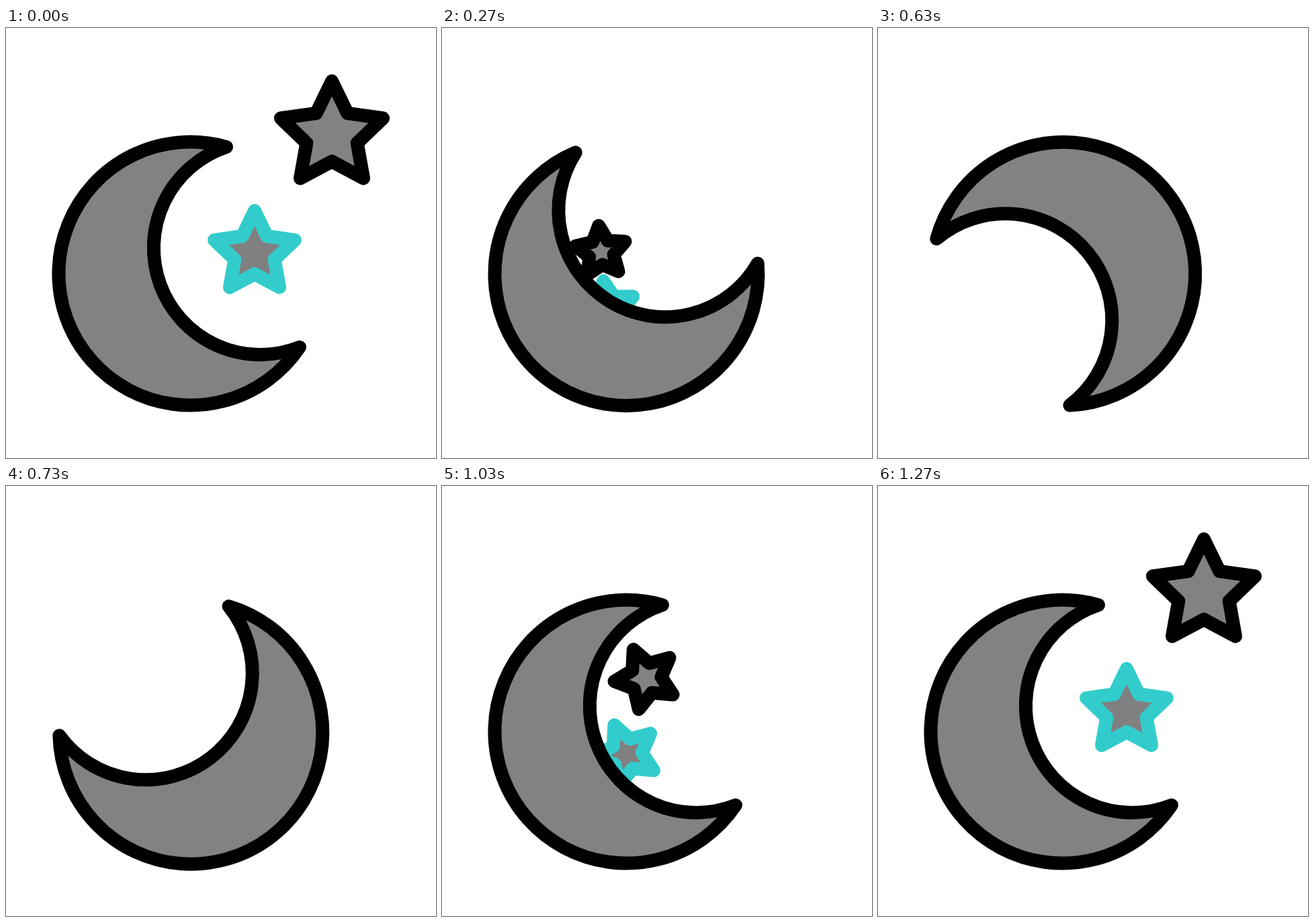
These frames come from a looping animation (640 by 640 pixels, 1.67 s). An HTML page with a canvas:

```html
<!DOCTYPE html>
<html lang="en">
<head>
<meta charset="utf-8">
<title>Moon and stars</title>
<style>
  html, body { margin: 0; width: 100%; height: 100%; overflow: hidden; background: #fff; }
  canvas { display: block; width: 640px; height: 640px; }
</style>
</head>
<body>
<canvas id="stage" width="640" height="640"></canvas>
<script>
const ctx = document.getElementById('stage').getContext('2d');
const LOOP = 1670;
const LAST_STEP = 38;
const GRAY = '#818281';

// Times below are in steps of 1/30 s.
const STARS_HIDDEN = 12;
const RAD = Math.PI / 180;
const moonPivot = { x: 275.3, y: 365.8 };
const moonPath = new Path2D(
  'M328 177 A196 196 0 1 0 437 475 A158.71 158.71 0 1 1 328 177 Z');

const stars = [
  { color: '#33cccc', fill: '#808080', from: { x: 370, y: 335, size: 63 },
    to: { x: 203, y: 447.5, size: 35 }, spin: 86, back: 25.2, grow: 25.2 },
  { color: '#000', fill: GRAY, from: { x: 485, y: 159, size: 80 },
    to: { x: 150, y: 394, size: 24.6 }, spin: 90, back: 24.75, grow: 25.6 }
];

const lerp = (a, b, p) => a + (b - a) * p;

function ease(step, start, end) {
  const u = Math.min(1, Math.max(0, (step - start) / (end - start)));
  return u * u * (3 - 2 * u);
}

function paint(path, fill, stroke) {
  ctx.fillStyle = fill;
  ctx.strokeStyle = stroke;
  ctx.lineWidth = 20;
  ctx.lineJoin = 'round';
  ctx.fill(path);
  ctx.stroke(path);
}

function starPath(x, y, size, turn) {
  const path = new Path2D();
  for (let i = 0; i < 10; i++) {
    const r = i % 2 ? size * 0.495 : size;
    const a = (turn - 90 + i * 36) * RAD;
    path.lineTo(x + r * Math.cos(a), y + r * Math.sin(a));
  }
  path.closePath();
  return path;
}

function drawStar(star, step) {
  const { from, to } = star;
  if (step > STARS_HIDDEN && step < star.back) return;
  const away = ease(step, 0, STARS_HIDDEN);
  const p = away - ease(step, star.back, LAST_STEP);
  const shrink = away - ease(step, star.grow, LAST_STEP);
  const path = starPath(lerp(from.x, to.x, p), lerp(from.y, to.y, p),
    lerp(from.size, to.size, shrink), star.spin * p);
  paint(path, star.fill, star.color);
}

// The moon winds up backwards, then swings through to a full turn.
function drawMoon(step) {
  const turn = -45 * ease(step, 0, 10.5) + 405 * ease(step, 9.26, 28.49);
  ctx.save();
  ctx.translate(moonPivot.x, moonPivot.y);
  ctx.rotate(turn * RAD);
  ctx.translate(-moonPivot.x, -moonPivot.y);
  paint(moonPath, GRAY, '#000');
  ctx.restore();
}

// Steps begin on whole hundredths of a second.
function stepAt(ms) {
  return Math.min(LAST_STEP, Math.floor((Math.floor(ms / 10) + 0.5) * 0.3));
}

function draw(ms) {
  const step = stepAt(ms);
  ctx.fillStyle = '#fff';
  ctx.fillRect(0, 0, 640, 640);
  stars.forEach(star => drawStar(star, step));
  drawMoon(step);
}

const begin = performance.now();
function tick() {
  draw((performance.now() - begin) % LOOP);
  requestAnimationFrame(tick);
}
tick();
</script>
</body>
</html>
```
